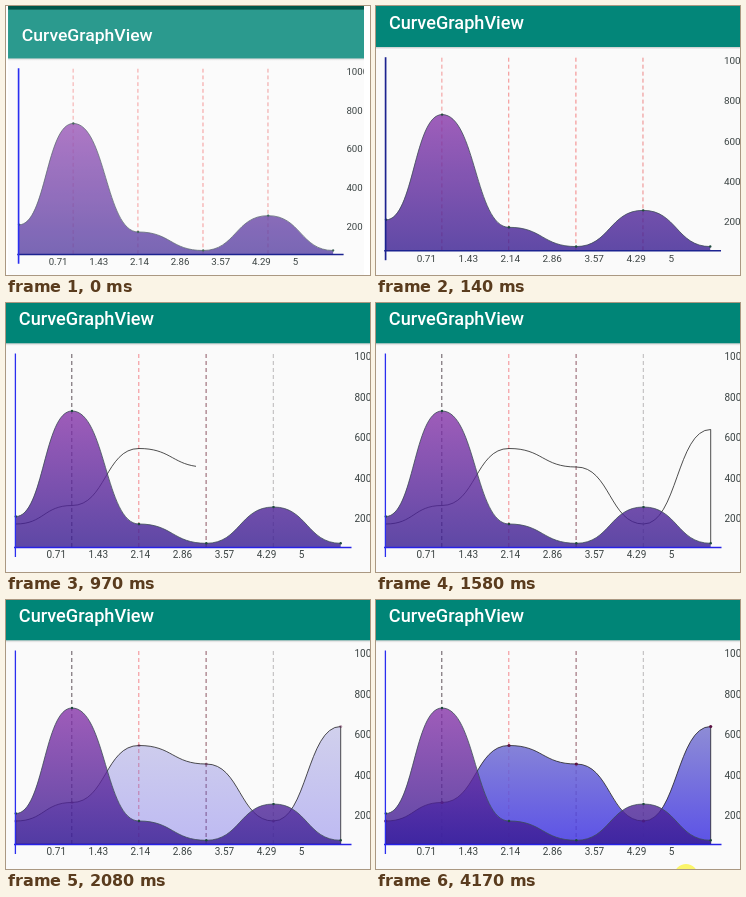
Recreate the animation shown at these times as an HTML page. Size 364 by 269 pixels, loop 4.22 s.

```html
<!DOCTYPE html>
<html lang="en">
<head>
<meta charset="utf-8">
<title>Curve graph</title>
<style>
  html, body { margin: 0; width: 100%; height: 100%; overflow: hidden; background: #fff; }
  svg { display: block; width: 364px; height: 269px; }
  text { font: 10px Roboto, sans-serif; fill: #3a4242; }
  .title { font-size: 18.15px; font-weight: 500; fill: #fff; }
</style>
</head>
<body>
<svg viewBox="0 0 364 269">
  <defs>
    <linearGradient id="violet" gradientUnits="userSpaceOnUse" x1="0" y1="108" x2="0" y2="244">
      <stop stop-color="#8735a9"/><stop offset="1" stop-color="#371b90"/>
    </linearGradient>
    <linearGradient id="blue" gradientUnits="userSpaceOnUse" x1="0" y1="126" x2="0" y2="244">
      <stop stop-color="#7b79cf"/><stop offset="1" stop-color="#4035e3"/>
    </linearGradient>
    <linearGradient id="shade" x2="0" y2="1">
      <stop stop-opacity=".16"/><stop offset="1" stop-opacity="0"/>
    </linearGradient>
    <clipPath id="edge"><rect x="-1.5" y="-40" width="368.1" height="340"/></clipPath>
  </defs>
  <g id="screen" clip-path="url(#edge)">
    <rect x="-2" y="-40" width="370" height="340" fill="#fafafa"/>
    <rect x="-2" y="-11" width="370" height="51.3" fill="#008577"/>
    <rect x="-2" y="40.3" width="370" height="2.5" fill="url(#shade)"/>
    <text class="title" x="12.8" y="22.2">CurveGraphView</text>
    <g id="grid" stroke-width=".75" stroke-dasharray="4 3"></g>
    <path id="fill2" fill="url(#blue)" fill-opacity=".85"/>
    <path id="line2" fill="none" stroke="#222" stroke-width=".8" pathLength="1"/>
    <g id="dots2" fill="#5c1142"></g>
    <path id="fill1" fill="url(#violet)" fill-opacity=".8"/>
    <path id="line1" fill="none" stroke="#3c4c55" stroke-width=".8"/>
    <g id="dots1" fill="#1d4a3c"></g>
    <rect id="veil" x="-2" y="-11" width="370" height="310" fill="#fff"/>
    <path id="axisX" d="M8 244.5H345.5"/>
    <path id="axisY" d="M9.4 50.5V254"/>
    <g id="labels"></g>
    <rect x="-2" y="-40" width="370" height="29.5" fill="#00574b"/>
  </g>
  <circle id="touch" cx="310" cy="276" r="12" fill="#fbf56a"/>
</svg>
<script>
const $ = id => document.getElementById(id);
const set = (id, attrs) => Object.entries(attrs).forEach(([k, v]) => $(id).setAttribute(k, v));
const clamp = v => Math.max(0, Math.min(1, v));
const LOOP = 4220, BASE = 244;
const xs = [9.8, 66, 133, 200.3, 267.5, 334.7];
const heights = [[213.5, 108, 221, 240.3, 204, 240.3], [221, 202.5, 145.5, 164, 221, 126.5]];

// Smooth curve with level tangents at every point
const curve = ys => ys.reduce((d, y, i) => {
  if (!i) return `M${xs[0]} ${y}`;
  const mid = (xs[i - 1] + xs[i]) / 2;
  return `${d}C${mid} ${ys[i - 1]} ${mid} ${y} ${xs[i]} ${y}`;
}, "");

heights.forEach((ys, i) => {
  const top = curve(ys), area = `${top}V${BASE}H${xs[0]}Z`, n = i + 1;
  set("fill" + n, { d: area });
  set("line" + n, { d: i ? area : top });
  $("dots" + n).innerHTML = ys.map((y, j) => `<circle cx="${xs[j]}" cy="${y}" r="${1.2 + .4 * i}"/>`).join("");
});

$("grid").innerHTML = xs.slice(1, 5).map(x => `<path d="M${x - .2} 51V${BASE}"/>`).join("");
const label = (x, y, s) => `<text x="${x}" y="${y}">${s}</text>`;
$("labels").innerHTML =
  ["0.71", "1.43", "2.14", "2.86", "3.57", "4.29", "5"].map((s, i) => label(40.5 + 42.05 * i, 255.4, s)).join("") +
  [1000, 800, 600, 400, 200].map((s, i) => label(348.4, 57.2 + 40.45 * i, s)).join("");

const early = ["#f07070", "#f06262", "#f05656", "#e85c5c"];
const settled = ["#2c1c26", "#f0646c", "#6a2233", "#a5a0a3"];

function draw(t) {
  // Opening zoom
  const k = (1 - clamp((t - 50) / 150)) ** 3;
  set("screen", { transform:
    `translate(${3.5 * k} ${13.8 * k}) scale(${1 - .033 * k} ${1 - .04 * k})` });
  set("veil", { opacity: .17 * k });

  const opening = t < 200;
  [...$("grid").children].forEach((p, i) => p.setAttribute("stroke", (opening ? early : settled)[i]));
  const width = opening ? 1.7 : 1.3;
  set("axisX", { stroke: opening ? "#1c2390" : "#2622e6", "stroke-width": width });
  set("axisY", { stroke: opening && t >= 50 ? "#1c2390" : "#2a2ef0", "stroke-width": width });

  // Outline drawn with accelerate-decelerate easing
  const p = .5 - .5 * Math.cos(Math.PI * clamp((t - 180) / 2450));
  set("line2", {
    "stroke-dasharray": t < 1990 ? `${p} 2` : "none",
    visibility: p > 0 ? "visible" : "hidden"
  });

  const fade = clamp((t - 1995) / 225);
  set("fill2", { opacity: fade });
  set("dots2", { opacity: fade });
  set("touch", { visibility: t >= 4170 ? "visible" : "hidden" });
}

const start = performance.now();
function tick() {
  draw((performance.now() - start) % LOOP);
  requestAnimationFrame(tick);
}
tick();
</script>
</body>
</html>
```
